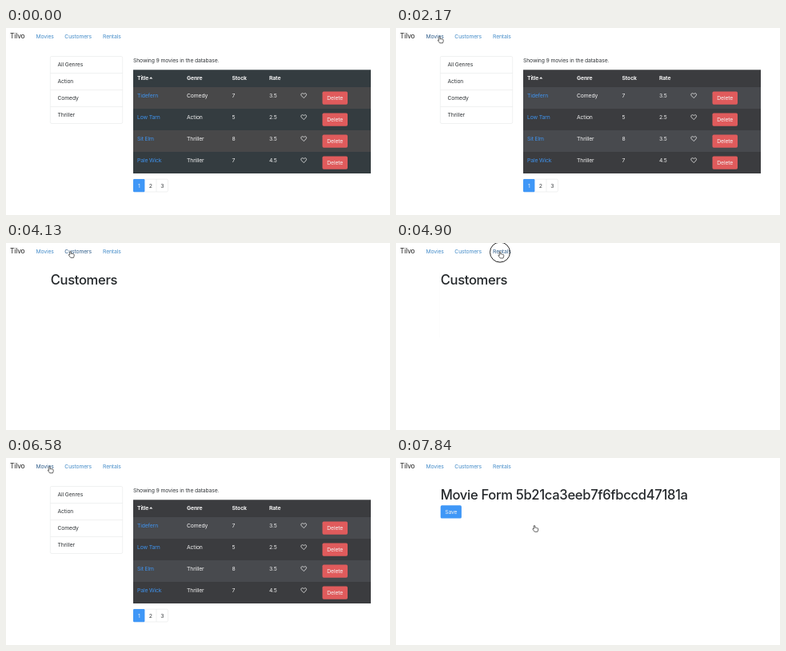
These frames come from a looping animation (480 px wide and 234 px high, 8 s). An HTML page:

```html
<!DOCTYPE html>
<html lang="en">
<head>
<meta charset="utf-8">
<title>Movie rental demo</title>
<style>
html, body { margin: 0; width: 100%; height: 100%; overflow: hidden; background: #fff; }
svg { display: block; width: 480px; height: 234px; --dark: #343c40; --stripe: #484849; }
svg.late { --dark: #3b3c3f; --stripe: #484a4e; }
text { font: 6.8px Inter, Roboto, sans-serif; letter-spacing: -.02em; fill: #33373a; }
.brand { font-size: 8.5px; fill: #222; }
.h1 { font-size: 16.6px; font-weight: 500; fill: #24282b; }
.nav { fill: #468dc9; }
.nav.hover { fill: #315f8c; }
.link { fill: #3f93ee; }
.link.hover { fill: #2c72bd; text-decoration: underline; }
.light { fill: #f2f2f2; }
.bold { font-weight: 700; }
.mid { text-anchor: middle; }
.dark { fill: var(--dark); }
.stripe { fill: var(--stripe); }
.rule { fill: none; stroke: #e6e7e8; stroke-width: .6; }
.blue { fill: #3f97f7; }
.red { fill: #e05b5c; }
</style>
</head>
<body>
<svg id="stage" viewBox="0 0 480 234">
  <g id="nav"></g>
  <g id="movies"></g>
  <g id="customers"></g>
  <g id="rentals"></g>
  <g id="form"></g>
  <circle id="ring" fill="none" stroke="#222"/>
  <g id="cursor">
    <path id="arrow" d="M0 0V6.6L1.6 5.2L2.7 7.7L3.8 7.2L2.7 4.8H4.8Z" fill="#111" stroke="#fff" stroke-width=".4"/>
    <path id="hand" d="M-.8 .6Q0-.5 .8 .6V3Q1.6 2.4 2.2 3.2Q3 2.7 3.5 3.5Q4.6 3.1 4.7 4.3V5.8L3.9 8H.3L-2 5Q-2.3 4-1.5 4L-.8 4.7Z" fill="#fff" stroke="#333" stroke-width=".75" stroke-linejoin="round"/>
  </g>
</svg>
<script>
const $ = id => document.getElementById(id);

function add(parent, tag, attrs, label) {
  const el = document.createElementNS('http://www.w3.org/2000/svg', tag);
  for (const key in attrs) el.setAttribute(key, attrs[key]);
  if (label) el.textContent = label;
  return parent.appendChild(el);
}
const text = (g, x, y, label, cls = '') => add(g, 'text', { x, y, class: cls }, label);
const box = (g, x, y, width, height, cls, rx = 0) => add(g, 'rect', { x, y, width, height, rx, class: cls });
const line = (g, d) => add(g, 'path', { d, class: 'rule' });

text($('nav'), 5, 13.2, 'Tilvo', 'brand');
const links = [[37.5, 'Movies'], [73.3, 'Customers'], [121, 'Rentals']]
  .map(([x, label]) => text($('nav'), x, 12.5, label, 'nav'));

function drawMovies(g) {
  box(g, 55.3, 35.5, 90.4, 84, 'rule', 1.7);
  ['All Genres', 'Action', 'Comedy', 'Thriller'].forEach((label, i) => {
    if (i) line(g, `M55.3 ${35.5 + i * 21}h90.4`);
    text(g, 64.5, 48.2 + i * 21, label);
  });

  text(g, 159, 42.6, 'Showing 9 movies in the database.');
  box(g, 159, 52.3, 297, 129.7, 'dark');
  const cols = [164, 226, 282.5, 329];
  ['Title', 'Genre', 'Stock', 'Rate'].forEach((label, i) => text(g, cols[i], 65.4, label, 'light bold'));
  add(g, 'path', { d: 'M179 63.6L181.2 61.2L183.4 63.6Z', class: 'light' });

  const films = [
    ['Tidefern', 'Comedy', '7', '3.5'],
    ['Low Tarn', 'Action', '5', '2.5'],
    ['Sit Elm', 'Thriller', '8', '3.5'],
    ['Pale Wick', 'Thriller', '7', '4.5']
  ];
  const titles = films.map((film, i) => {
    const y = 74 + i * 27;
    if (i % 2 === 0) box(g, 159, y, 297, 27, 'stripe');
    const cells = film.map((label, c) => text(g, cols[c], y + 13, label, c ? 'light' : 'link'));
    add(g, 'path', {
      d: `M372.2 ${y + 13.6}l-2.8-2.8c-1.8-2.2 1-4.4 2.8-2.1c1.8-2.3 4.6-.1 2.8 2.1z`,
      fill: 'none', stroke: '#eee', 'stroke-width': .8
    });
    box(g, 395.5, y + 5.5, 31.5, 16.3, 'red', 1.7);
    text(g, 411.2, y + 16, 'Delete', 'light mid');
    return cells[0];
  });

  box(g, 159.2, 189.2, 43.3, 15.8, 'rule', 1.7);
  line(g, 'M188 189.2v15.8');
  box(g, 159, 189, 14.4, 16.2, 'blue', 1.2);
  ['1', '2', '3'].forEach((n, i) => text(g, 166.2 + i * 14.5, 199.6, n, i ? 'mid' : 'light mid'));
  return titles[0];
}

const firstTitle = drawMovies($('movies'));
text($('customers'), 55.7, 51.6, 'Customers', 'h1');
text($('rentals'), 55.7, 51.6, 'Rentals', 'h1');
text($('form'), 55.7, 51.6, 'Movie Form 5b21ca3eeb7f6fbccd47181a', 'h1');
box($('form'), 55.7, 59.2, 26.2, 16.4, 'blue', 1.7);
text($('form'), 68.8, 69.9, 'Save', 'light mid');

const LOOP = 8000, STEP = 70;
const pages = [[0, 'movies'], [4130, 'customers'], [5040, 'rentals'], [5810, 'customers'], [6440, 'movies'], [7770, 'form']];
// time, x, y of the pointer tip
const path = [
  [350, 130, 140], [980, 53.5, 11], [1540, 53.5, 11], [1610, 54.5, 10.8], [2800, 54.5, 10.8],
  [2940, 55.5, 10.5], [3150, 55.5, 10.5], [3220, 54.8, 10.6], [3360, 54.8, 10.6], [3850, 80.5, 10.4],
  [4270, 80.5, 10.4], [4760, 130, 11], [5180, 130, 11], [5320, 104.8, 10.7], [5460, 104, 10.5],
  [5880, 104, 10.5], [6160, 54.5, 10.8], [6650, 54.5, 10.8], [7350, 173, 84.3], [LOOP, 173, 84.3]
];
// start, end, radius
const clicks = [[1120, 1400, 9.5], [3990, 4130, 11], [4900, 5040, 12.5], [5670, 5810, 12.5], [6300, 6440, 11], [7630, 7770, 11]];

function pointAt(t) {
  const i = path.findIndex(p => p[0] > t);
  if (i < 1) return path[0].slice(1);
  const [t0, x0, y0] = path[i - 1], [t1, x1, y1] = path[i];
  const u = (t - t0) / (t1 - t0), k = u * u * (3 - 2 * u);
  return [x0 + (x1 - x0) * k, y0 + (y1 - y0) * k];
}

const show = (el, on) => { el.style.display = on ? '' : 'none'; };

function render(now) {
  const t = Math.floor(now % LOOP / STEP) * STEP;
  const [x, y] = pointAt(t);
  const page = pages.filter(p => p[0] <= t).pop()[1];
  for (const id of ['movies', 'customers', 'rentals', 'form']) show($(id), id === page);
  $('stage').classList.toggle('late', t >= 2030);

  const inNav = t >= 1610 && y < 17;
  const over = [[37, 60], [73, 108], [121, 144]].map(([a, b]) => inNav && x >= a && x <= b);
  links.forEach((el, i) => el.classList.toggle('hover', over[i]));
  const onTitle = page === 'movies' && x > 163 && x < 191 && y > 79 && y < 90;
  firstTitle.classList.toggle('hover', onTitle);

  const pointing = over.includes(true) || onTitle || page === 'form';
  show($('cursor'), t >= 420);
  show($('arrow'), !pointing);
  show($('hand'), pointing);
  $('cursor').setAttribute('transform', `translate(${x} ${y})`);

  const click = clicks.find(c => t >= c[0] && t < c[1]);
  show($('ring'), click);
  if (click) {
    $('ring').setAttribute('cx', x);
    $('ring').setAttribute('cy', y + .6);
    $('ring').setAttribute('r', click[2]);
  }
}

function tick() {
  render(performance.now());
  requestAnimationFrame(tick);
}
tick();
</script>
</body>
</html>
```
